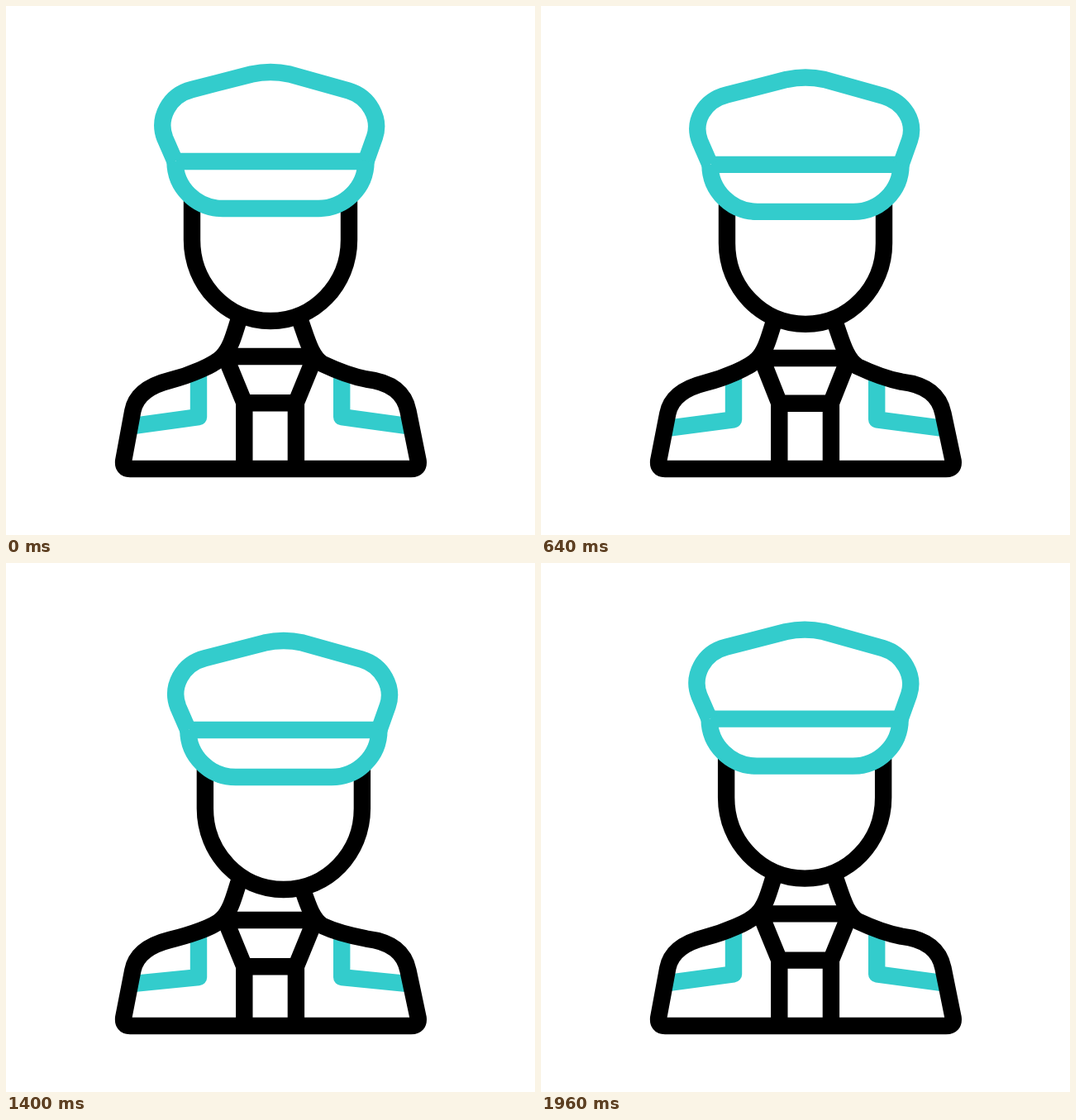
These frames come from a looping animation (640x640 px, 2000 ms). An HTML page:

```html
<!DOCTYPE html>
<html lang="en">
<head>
<meta charset="utf-8">
<title>Officer</title>
<style>
  html, body { margin: 0; width: 100%; height: 100%; overflow: hidden; background: #fff; }
  svg { display: block; width: 100%; height: 100%; }
  path { fill: none; stroke: #000; stroke-width: 20.4; stroke-linejoin: round; }
  .teal { stroke: #33cccc; }
  #head { fill: #fff; }
</style>
</head>
<body>
<svg viewBox="0 0 640 640">
  <path id="epaulettes" class="teal"/>
  <path id="tie"/>
  <path id="body"/>
  <g id="headGroup">
    <path id="head" d="M225 236V283C225 337 267 381 320 381S415 337 415 283V236"/>
    <path class="teal" d="M204.5 187.5V188A57.5 57 0 0 0 262 245H378A57.5 57 0 0 0 435.5 188V187.5M206 188H436"/>
    <path id="crown" class="teal"/>
  </g>
</svg>
<script>
const LOOP = 2000, STEP = 40, MIDDLE = 319.6;

const el = id => document.getElementById(id);
const setPath = (id, d) => el(id).setAttribute("d", d);
const mirror = x => 2 * MIDDLE - x;

function ramp(t, from, to) {
  const u = Math.min(1, Math.max(0, (t - from) / (to - from)));
  return u * u * (3 - 2 * u);
}

function draw(t) {
  const takeOff = ramp(t, 120, 330), drop = ramp(t, 330, 520), recover = ramp(t, 520, 700);
  const lookRight = ramp(t, 700, 1080), lookLeft = ramp(t, 1360, 1680), back = ramp(t, 1680, 2000);
  const hop = takeOff - drop;
  const squash = drop - recover;
  const bow = lookRight + 0.1 * lookLeft - 1.1 * back;
  const sway = 17.5 * lookRight - 37.5 * lookLeft + 20 * back;

  // Every part shares the same three motions, each with its own reach in pixels.
  const offset = (lift, sink, droop) => sink * squash + droop * bow - lift * hop;
  const point = dy => (x, y) => `${x} ${(y + dy).toFixed(2)} `;
  const part = (...reach) => point(offset(...reach));

  const headY = offset(40, 15, 14);
  const top = point(offset(44.5, 25, 14) - headY);
  const collar = part(32, 8, 8), knot = part(36.5, 2, 8);
  const joint = part(33, 12, 6), shoulder = part(33, 12, 3);
  const corner = part(40, 12, 4), tip = part(45, 11, 1);
  const hem = point(Math.min(0, offset(32, 3, 0)));

  el("headGroup").setAttribute("transform", `translate(${sway} ${headY})`);

  setPath("crown", "M204.5 188L192.3 160C183 136 " + top(197, 108) + top(225, 101) +
    "L" + top(297, 82.5) + "C" + top(312, 79.2) + top(328, 79.2) + top(343, 82.5) +
    "L" + top(414.5, 102.5) + "C" + top(439.5, 110) + "453.5 136 446 158.5L435.5 188");

  const epaulette = side =>
    "M" + shoulder(side(233), 443) + "L" + corner(side(233), 497.2) + "L" + tip(side(155), 507.8);
  const same = x => x;
  setPath("epaulettes", epaulette(same) + epaulette(mirror));

  const pinch = 5 * squash;
  const lapel = side =>
    "M" + hem(side(288.3), 560) + "L" + knot(side(288.3), 480) + "L" + collar(side(267 + pinch), 428);
  setPath("tie", lapel(same) + lapel(mirror) +
    "M" + collar(268, 424) + "L" + collar(370, 424) +
    "M" + knot(288, 480.2) + "L" + knot(351, 480.2));

  setPath("body",
    "M" + joint(288, 356) + "L" + joint(281.5, 380) +
    "C" + joint(276, 397) + joint(272, 414) + joint(262, 424) +
    "C" + joint(253, 434) + shoulder(222, 447) + shoulder(198, 453) +
    "C" + shoulder(172, 459.5) + shoulder(157, 471) + shoulder(153.3, 490) +
    "L" + hem(142.2, 550) + "Q" + hem(141, 560) + hem(150, 560) +
    "L" + hem(490, 560) + "Q" + hem(500, 560) + hem(498.6, 550) +
    "L" + shoulder(486.5, 490) +
    "C" + shoulder(482, 468) + shoulder(466, 455) + shoulder(436, 451.5) +
    "C" + shoulder(420, 448.5) + joint(400, 441) + joint(383, 433) +
    "C" + joint(369, 424) + joint(364, 403) + joint(356.5, 382) +
    "L" + joint(348, 356));
}

function frame(now) {
  draw(Math.floor((now % LOOP) / STEP) * STEP);
  requestAnimationFrame(frame);
}
draw(0);
requestAnimationFrame(frame);
</script>
</body>
</html>
```
